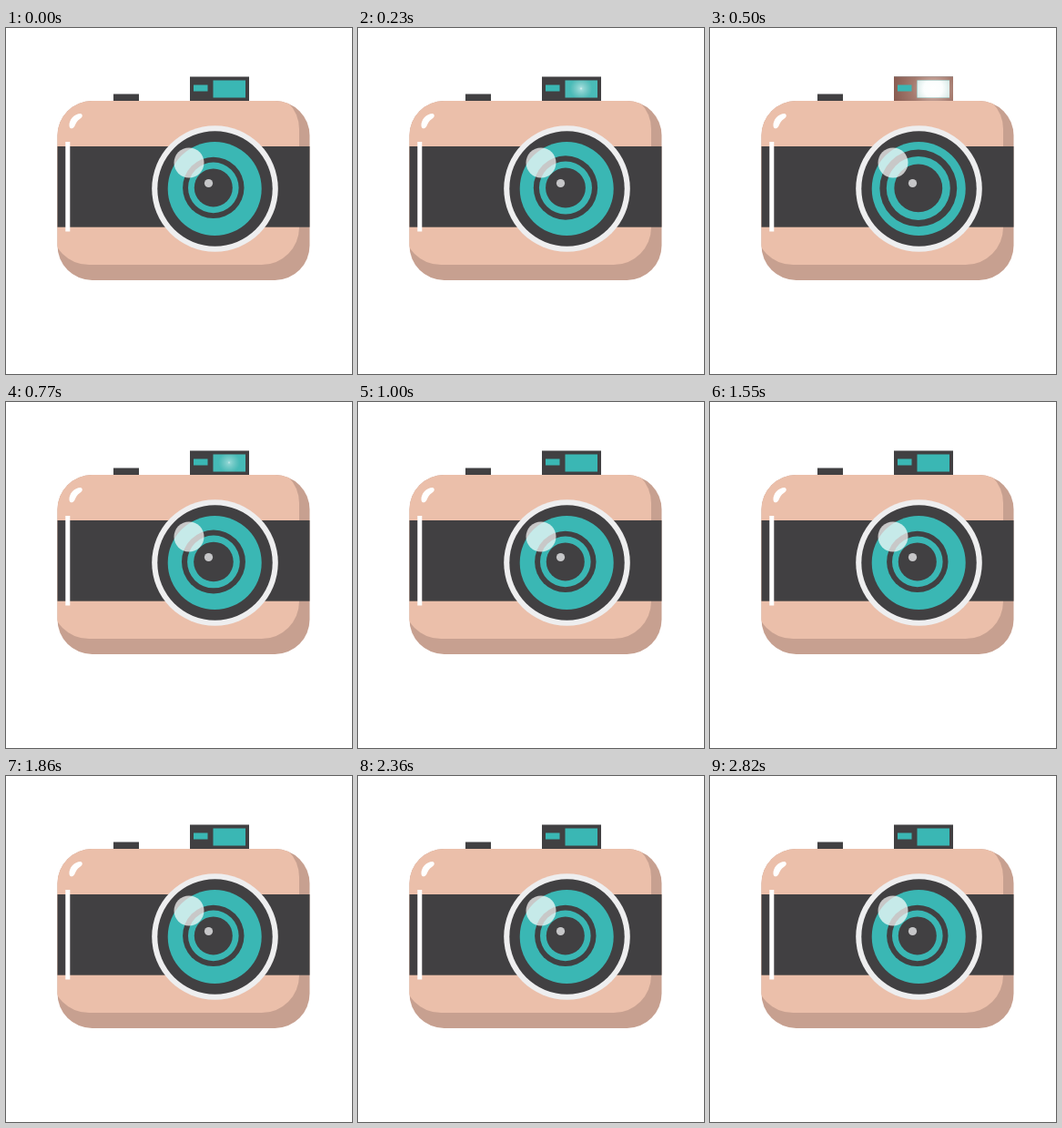
Recreate the animation shown at these times as an HTML page with a canvas. Size 380 by 380 pixels, loop 2870 ms.

```html
<!DOCTYPE html>
<html lang="en">
<head>
<meta charset="utf-8">
<title>Camera</title>
<style>
html, body { margin: 0; width: 100%; height: 100%; overflow: hidden; background: #fff; }
canvas { display: block; width: 380px; height: 380px; }
</style>
</head>
<body>
<canvas id="stage" width="380" height="380"></canvas>
<script>
const ctx = document.getElementById('stage').getContext('2d');
const LOOP = 2870;
const DARK = '#414042', TEAL = '#3ab7b4', SKIN = '#ebbfaa', SHADE = '#c7a090';
const FLASH = { start: 140, peak: 490, end: 860 };

const smooth = (a, b, x) => {
  const k = Math.min(1, Math.max(0, (x - a) / (b - a)));
  return k * k * (3 - 2 * k);
};

function disc(x, y, r, color) {
  ctx.fillStyle = color;
  ctx.beginPath();
  ctx.arc(x, y, r, 0, Math.PI * 2);
  ctx.fill();
}

function box(x, y, w, h, color) {
  ctx.fillStyle = color;
  ctx.fillRect(x, y, w, h);
}

function roundBox(x, y, w, h, r) {
  ctx.beginPath();
  ctx.roundRect(x, y, w, h, r);
}

function glow(x, y, r, stops) {
  const g = ctx.createRadialGradient(x, y, 0, x, y, r);
  stops.forEach(([at, color]) => g.addColorStop(at, color));
  return g;
}

function drawFlash(power) {
  box(202, 53.5, 65, 28, DARK);
  if (power > 0) {
    ctx.globalAlpha = smooth(0.2, 1, power);
    box(202, 53.5, 65, 28, glow(245, 67, 46, [[0, '#d9bcb2'], [0.5, '#a47a6e'], [1, '#85594f']]));
    ctx.globalAlpha = 1;
  }
  box(206, 62.5, 15.5, 7, TEAL);
  box(227.5, 57.5, 35.5, 19, TEAL);
  if (power > 0) {
    const r = 8 + 26 * power;
    ctx.globalAlpha = Math.min(1, power * 5);
    box(227.5, 57.5, 35.5, 19, glow(245, 66.5, r, [
      [0, '#fff'], [0.1 + 0.2 * power, `rgba(255,255,255,${0.5 + 0.48 * power})`],
      [1, `rgba(225,225,220,${0.65 * power})`]
    ]));
    ctx.globalAlpha = 1;
  }
}

function drawBody() {
  box(118, 72.5, 28, 9, DARK);
  ctx.save();
  roundBox(56.5, 80, 277, 197, 38);
  ctx.clip();
  box(56, 80, 278, 198, SHADE);
  roundBox(50, 70, 272, 190, 41);
  ctx.fillStyle = SKIN;
  ctx.fill();
  box(56, 130, 278, 88.7, DARK);
  ctx.restore();

  box(65.3, 125, 5, 98.5, '#fff');
  ctx.fillStyle = '#fff';
  ctx.beginPath();
  ctx.moveTo(69.5, 107.5);
  ctx.bezierCurveTo(69, 101, 75, 94, 82, 94);
  ctx.bezierCurveTo(85, 95, 84, 98.5, 81, 100);
  ctx.bezierCurveTo(78, 102, 77, 104, 75.5, 107.5);
  ctx.bezierCurveTo(74, 111, 70, 111.5, 69.5, 107.5);
  ctx.fill();
}

function drawLens(power) {
  const k = 1 + 0.26 * power;
  disc(229.5, 176.5, 69.3, '#eeeeef');
  disc(229.5, 176.5, 63.2, DARK);
  disc(229.2, 176.5, 51.5, TEAL);
  const x = 227.8 + power, y = 175.4 + 0.5 * power;
  disc(x, y, 33.7 * k, DARK);
  disc(x, y, 27.8 * k, TEAL);
  disc(x, y, 21 * k, DARK);
  disc(222.5, 170.5, 4.6, '#c6c6c8');
  disc(201, 148, 16.5, 'rgba(255,255,255,0.71)');
}

function draw(t) {
  const power = smooth(FLASH.start, FLASH.peak, t) * (1 - smooth(FLASH.peak, FLASH.end, t));
  box(0, 0, 380, 380, '#fff');
  drawFlash(power);
  drawBody();
  drawLens(power);
}

const begin = performance.now();
function tick() {
  draw((performance.now() - begin) % LOOP);
  requestAnimationFrame(tick);
}
tick();
</script>
</body>
</html>
```
